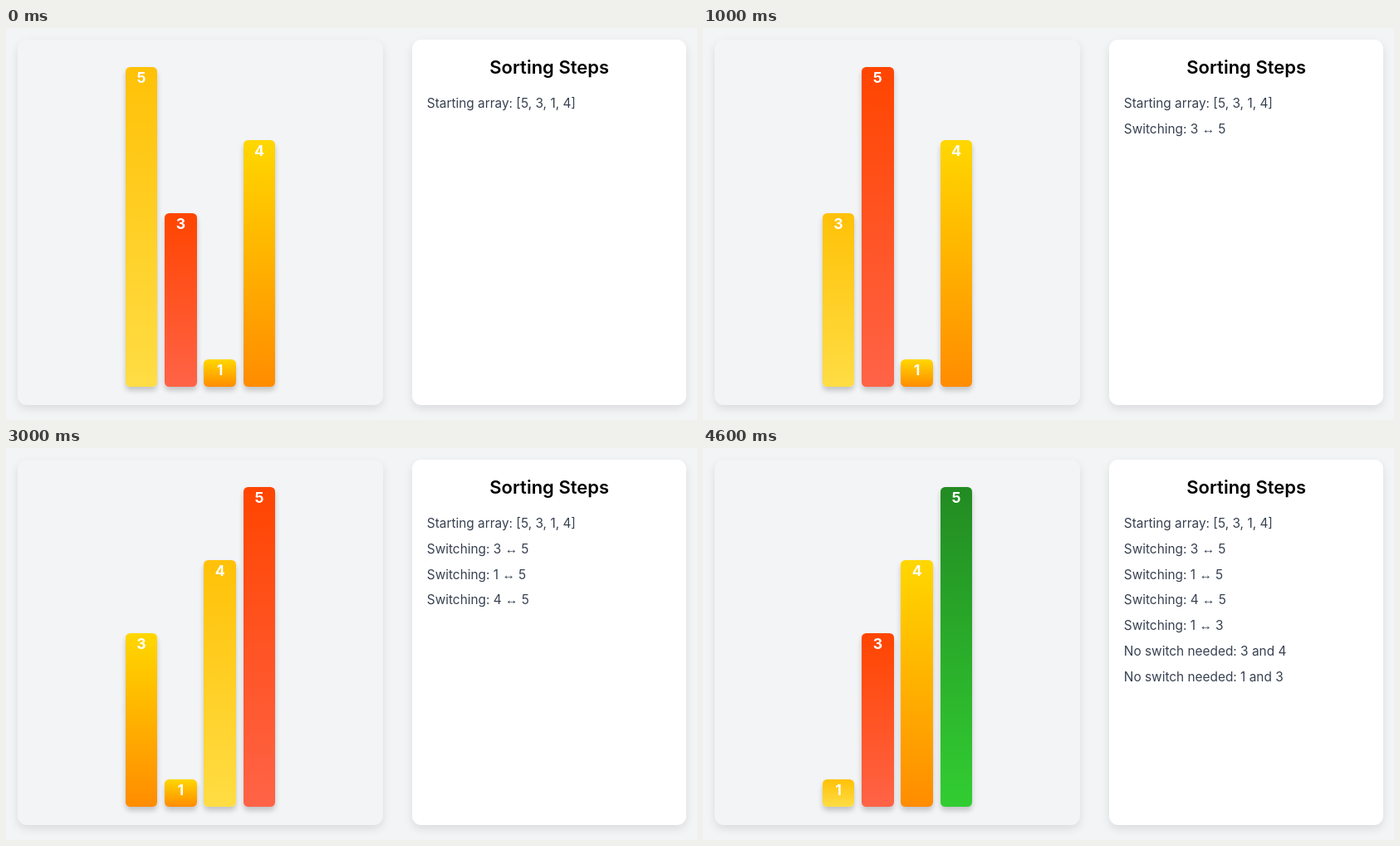
These frames come from a looping animation (832 by 472 pixels, 5 s). An HTML page:

```html
<!DOCTYPE html>
<html lang="en">
<head>
<meta charset="utf-8">
<title>Bubble sort</title>
<style>
  html, body { margin: 0; width: 100%; height: 100%; overflow: hidden; background: #f3f4f6; }
  body { position: relative; font-family: Inter, sans-serif; }
  #stage { position: absolute; left: 14px; top: 14px; }
  #scene { zoom: 1.1; display: flex; gap: 32px; }
  .panel {
    box-sizing: border-box; height: 400px; flex: none;
    border-radius: 10px; box-shadow: 0 4px 10px rgba(0, 0, 0, .1);
  }
  #bars {
    width: 400px; padding-bottom: 20px;
    display: flex; justify-content: center; align-items: flex-end; gap: 8px;
  }
  #log { width: 300px; padding: 16px; background: #fff; }
  .bar {
    width: 35px; border-radius: 5px; box-shadow: 0 4px 6px rgba(0, 0, 0, .2);
    color: #fff; font-size: 16px; font-weight: 700; line-height: 24px; text-align: center;
  }
  .idle   { background: linear-gradient(#ffd700, #ff8c00); }
  .left   { background: linear-gradient(#ffc107, #ffdd44); }
  .right  { background: linear-gradient(#ff4500, #ff6347); }
  .sorted { background: linear-gradient(#228b22, #32cd32); }
  h2 { margin: 0 0 16px; font-size: 20px; font-weight: 600; line-height: 28px; text-align: center; color: #000; }
  p { margin: 0 0 8px; font-size: 14px; line-height: 20px; color: #374151; white-space: nowrap; }
  .arrow { font-family: "Liberation Sans", Arial, sans-serif; line-height: 0; }
</style>
</head>
<body>
<div id="stage">
  <div id="scene">
    <div id="bars" class="panel"></div>
    <div id="log" class="panel"><h2>Sorting Steps</h2></div>
  </div>
</div>
<script>
  const STEP_MS = 1000;
  const swap = (a, b) => `Switching: ${a} <span class="arrow">↔</span> ${b}`;
  const keep = (a, b) => `No switch needed: ${a} and ${b}`;

  const messages = [
    'Starting array: [5, 3, 1, 4]',
    swap(3, 5), swap(1, 5), swap(4, 5), swap(1, 3),
    keep(3, 4), keep(1, 3)
  ];

  // pair: index of the left bar being compared; sorted: bars settled at the end
  const steps = [
    { values: [5, 3, 1, 4], pair: 0, sorted: 0, lines: 1 },
    { values: [3, 5, 1, 4], pair: 0, sorted: 0, lines: 2 },
    { values: [3, 1, 5, 4], pair: 1, sorted: 0, lines: 3 },
    { values: [3, 1, 4, 5], pair: 2, sorted: 0, lines: 4 },
    { values: [1, 3, 4, 5], pair: 0, sorted: 1, lines: 7 }
  ];

  function add(parent, tag, html = '') {
    const el = document.createElement(tag);
    el.innerHTML = html;
    return parent.appendChild(el);
  }

  const barBox = document.getElementById('bars');
  const logBox = document.getElementById('log');
  const bars = steps[0].values.map(() => add(barBox, 'div'));
  const lines = messages.map(text => add(logBox, 'p', text));

  function barState(i, { pair, sorted }) {
    if (i >= bars.length - sorted) return 'sorted';
    if (i === pair) return 'left';
    return i === pair + 1 ? 'right' : 'idle';
  }

  function show(step) {
    bars.forEach((bar, i) => {
      const value = step.values[i];
      bar.className = 'bar ' + barState(i, step);
      bar.style.height = value * 80 - 50 + 'px';
      bar.textContent = value;
    });
    lines.forEach((line, i) => { line.hidden = i >= step.lines; });
  }

  let current = -1;
  const start = performance.now();

  function tick() {
    const elapsed = Math.max(0, performance.now() - start);
    const index = Math.floor(elapsed / STEP_MS) % steps.length;
    if (index !== current) show(steps[current = index]);
    requestAnimationFrame(tick);
  }
  tick();
</script>
</body>
</html>
```
